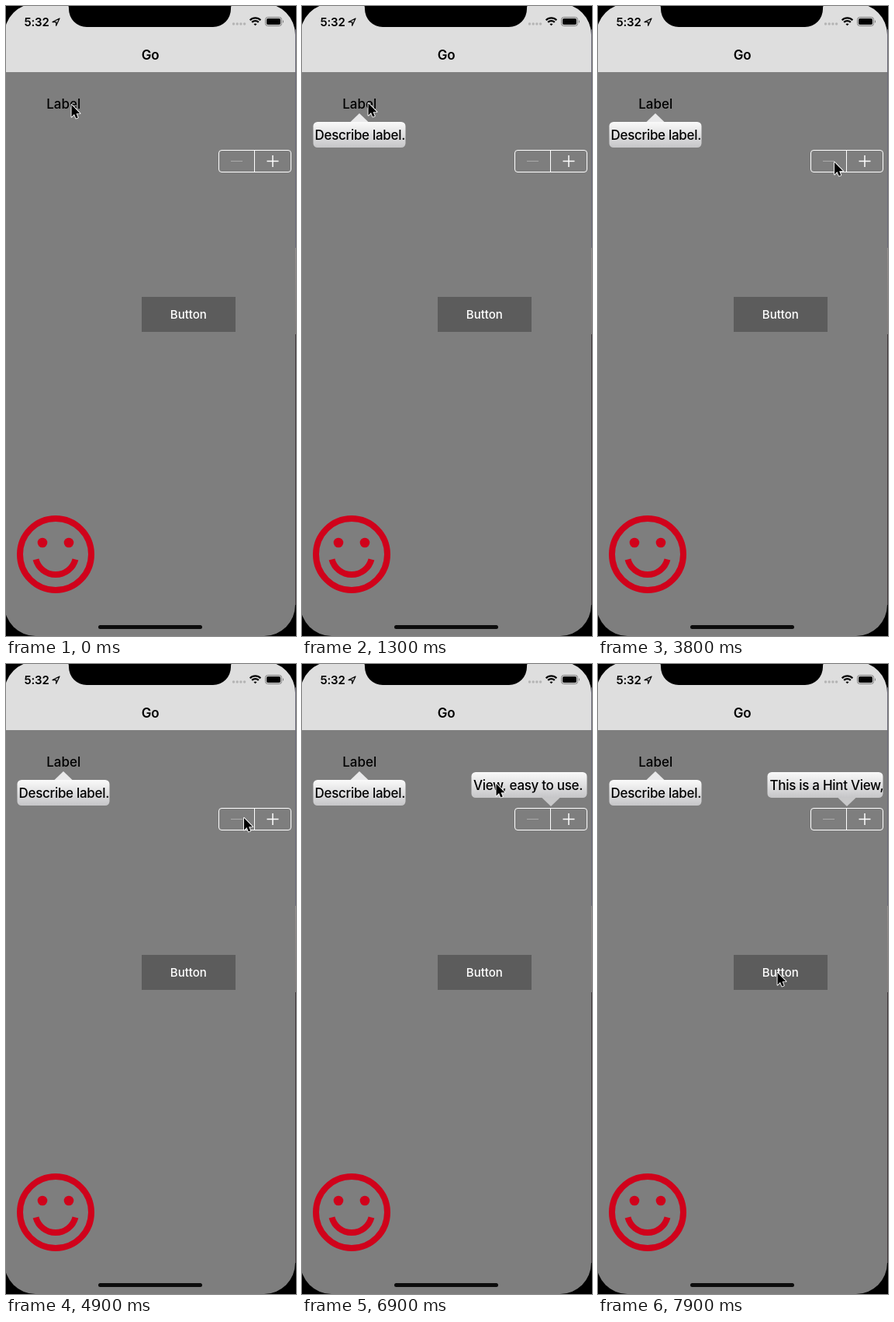
An HTML page for the animation above (8000 ms loop, 374 px wide and 810 px high).

```html
<!DOCTYPE html>
<html lang="en">
<head>
<meta charset="utf-8">
<title>Hint bubbles</title>
<style>
  html, body { margin: 0; width: 100%; height: 100%; overflow: hidden; background: #000; }
  svg { display: block; width: 374px; height: 810px; }
  text { font: 500 17px Inter, Roboto, sans-serif; }
  .mid { text-anchor: middle; }
  .hint { letter-spacing: -.3px; }
</style>
</head>
<body>
<svg viewBox="0 0 374 810">
  <defs>
    <linearGradient id="shine" x2="0" y2="1">
      <stop offset="0" stop-color="#fafafa"/>
      <stop offset="1" stop-color="#c6c6c8"/>
    </linearGradient>
    <linearGradient id="edge" x2="0" y2="1">
      <stop offset=".38" stop-color="#6a6878"/>
      <stop offset=".38" stop-color="#948e8e"/>
      <stop offset=".53" stop-color="#807a7a"/>
      <stop offset=".53" stop-color="#40363a"/>
    </linearGradient>
    <clipPath id="screen"><rect x="-2" y="-3" width="375" height="813" rx="40"/></clipPath>
    <clipPath id="window"><rect x="221" y="139" width="146.5" height="33"/></clipPath>
  </defs>

  <rect x="373" y="30" width="1" height="740" fill="url(#edge)"/>
  <g clip-path="url(#screen)">
    <rect width="373" height="810" fill="#7e7e7e"/>
    <rect width="373" height="85" fill="#dedede"/>
  </g>
  <path d="M75-3q6 0 6 6v1a23 23 0 0 0 23 23h163a23 23 0 0 0 23-23v-1q0-6 6-6z"/>
  <rect x="119" y="796" width="134" height="5" rx="2.5" fill="#0c0c0c"/>

  <!-- status bar -->
  <text x="23.5" y="25.500" style="font-size:15px;font-weight:600;letter-spacing:-.2px">5:32</text>
  <path d="M60 20.6 69 16l-4.300 9.300v-4.700z" fill="none" stroke="#000" stroke-width="1.200" stroke-linejoin="round"/>
  <path d="M293.500 23h15" stroke="#b4b4b4" stroke-width="3.400" stroke-linecap="round" stroke-dasharray="0 4.700"/>
  <g fill="none" stroke="#000" stroke-width="2.300">
    <path d="M314.700 18.200a9.600 9.600 0 0 1 13.600 0M317.200 20.900a6 6 0 0 1 8.600 0"/>
    <path d="M319.500 23.300q2-1.600 4 0l-2 2z" fill="#000" stroke="none"/>
  </g>
  <rect x="334.500" y="14.500" width="21" height="11" rx="3" fill="none" stroke="#777"/>
  <rect x="336" y="16" width="18" height="8" rx="1.800"/>
  <path d="M357 18q2 2 0 4z" fill="#777"/>

  <!-- page -->
  <text class="mid" x="186" y="69" style="font-weight:600;letter-spacing:-.3px">Go</text>
  <text class="mid" x="74.200" y="132">Label</text>
  <g fill="none" stroke="#fff">
    <rect x="274.500" y="185.500" width="93" height="28" rx="3.500"/>
    <path d="M320.500 185.500v28"/>
    <path d="M290 199.500h15" stroke="#aaa"/>
    <path d="M336.500 199.500h15M344 192v15" stroke-width="1.500"/>
  </g>
  <rect x="175" y="374" width="121" height="45" fill="#5c5c5c"/>
  <text class="mid" x="235.300" y="402" fill="#fff" style="font-size:15px;font-weight:450">Button</text>
  <g fill="none" stroke="#d0021b" stroke-width="8">
    <circle cx="64" cy="705" r="46"/>
    <path d="M38.500 711.500a26.400 26.400 0 0 0 51 0"/>
    <g fill="#d0021b" stroke="none">
      <circle cx="47" cy="690" r="6.300"/>
      <circle cx="81" cy="690" r="6.300"/>
    </g>
  </g>

  <!-- hints -->
  <g id="hint1">
    <path d="M62.500 149 74 138l11.500 11z" fill="#e9e9ea"/>
    <rect x="14.500" y="149" width="119" height="33" rx="5.500" fill="url(#shine)"/>
    <text class="mid hint" x="74.800" y="172">Describe label.</text>
  </g>
  <g id="hint2">
    <path d="M309.500 172h23L321 183z" fill="#c8c8c9"/>
    <rect x="218.500" y="139" width="149" height="33" rx="5.500" fill="url(#shine)"/>
    <g clip-path="url(#window)"><text id="marquee" class="hint" x="221.500" y="162">This is a Hint View, easy to use.</text></g>
  </g>

  <path id="cursor" d="M0 0v15.500l3.500-3.400 2.300 5.400 2.500-1.100-2.200-5.200h4.900z" stroke="#fff" stroke-width="1.800" stroke-linejoin="round" paint-order="stroke"/>
</svg>
<script>
const LOOP = 8000, STEP = 100;
const get = id => document.getElementById(id);

// Keys are [time, ...values], eased between neighbours
const POP1 = [[1000, 1.2], [1100, 1.08], [1200, 1.08], [1300, 1]];
const POP2 = [[5600, 1.2], [5700, 1.08], [5800, 1]];
const PATH = [
  [0, 84.5, 127], [900, 85.5, 125],
  [2300, 85.5, 125], [2400, 66.5, 170], [2500, 66.5, 170], [2600, 61, 167],
  [3000, 61, 167], [3800, 305, 201], [4200, 305, 205], [4400, 305, 205], [4900, 307, 198],
  [6000, 307, 198], [6600, 250.5, 154], [6900, 250.5, 154], [7700, 231.5, 397]
];

function at(keys, t) {
  const i = keys.findIndex(k => k[0] > t);
  if (i < 1) return keys.at(i).slice(1);
  const a = keys[i - 1], b = keys[i];
  const u = (t - a[0]) / (b[0] - a[0]), e = u * u * (3 - 2 * u);
  return a.slice(1).map((v, n) => v + (b[n + 1] - v) * e);
}

function pop(id, keys, t, x, y) {
  const [s] = at(keys, t), el = get(id);
  el.setAttribute('opacity', t < keys[0][0] ? 0 : 1 - (s - 1) * 3.2);
  el.setAttribute('transform', `translate(${x} ${y}) scale(${s}) translate(${-x} ${-y})`);
}

function draw(now) {
  const t = Math.floor(now % LOOP / STEP) * STEP;
  pop('hint1', POP1, t, 74, 163);
  pop('hint2', POP2, t, 293, 161);
  const shift = t < 5900 ? 0 : 52.5 * (1 - Math.cos(Math.PI * (t - 5900) / 1000));
  get('marquee').setAttribute('transform', `translate(${-shift} 0)`);
  get('cursor').setAttribute('transform', `translate(${at(PATH, t)})`);
}

const start = performance.now();
function frame() {
  draw(performance.now() - start);
  requestAnimationFrame(frame);
}
frame();
</script>
</body>
</html>
```
